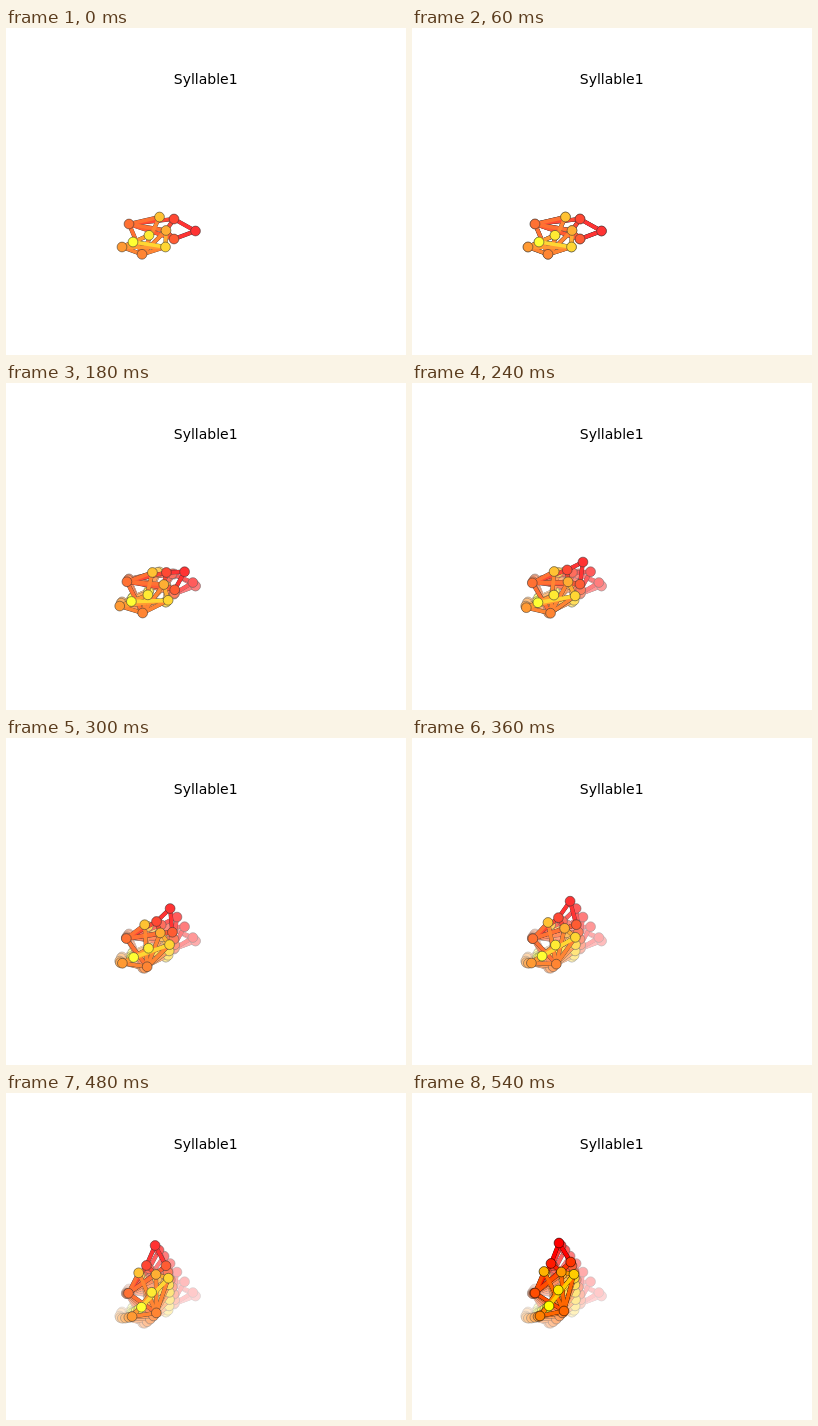
An HTML page that plays this animation: 400x327 px, repeating every 600 ms.

```html
<!DOCTYPE html>
<html lang="en">
<head>
<meta charset="utf-8">
<title>Syllable1</title>
<style>
html, body { margin: 0; width: 100%; height: 100%; overflow: hidden; background: #fff; }
svg { display: block; }
text { font: 14px "DejaVu Sans", sans-serif; text-anchor: middle; }
</style>
</head>
<body>
<svg width="400" height="327" viewBox="0 0 400 327">
  <g id="trail"></g>
  <text x="199.7" y="56">Syllable1</text>
</svg>
<script>
const STEPS = 10, STEP_MS = 60, VEIL = 0.2;
const trail = document.getElementById("trail");

// Each body point follows a quadratic curve: start, control, end
const paths = [
  [[189.5, 203], [168, 174.5], [147, 150]],    // nose
  [[168, 191], [153, 190.5], [139, 170.5]],    // ears
  [[168, 211], [171.5, 207], [158.7, 169]],
  [[123, 196], [117.5, 202.5], [123, 200]],    // hips
  [[136, 226.3], [135, 237.5], [152, 218]],
  [[116, 219], [108, 229], [128, 223]],        // tail
  [[160, 202.5], [156, 204], [149.3, 179]],    // neck
  [[153.5, 189], [138.5, 192], [132, 178.5]],  // shoulders
  [[159.5, 219], [166, 221], [162, 181.3]],
  [[143, 207.3], [139.5, 221], [146.3, 197]],  // spine
  [[127, 214], [121, 226], [137, 213]]
];

const edges = ["0-1", "0-2", "1-3", "1-6", "2-3", "2-6", "3-4", "3-6", "3-7",
  "4-5", "4-6", "4-7", "4-8", "5-8", "5-9", "6-8", "8-10"].map(e => e.split("-").map(Number));

const color = i => `rgb(255,${Math.round(i * 25.5)},0)`;

// The body rests briefly, then rises fast and slows down
const progress = step => 1 - Math.min(1, (STEPS - 1 - step) / 7.3) ** 1.5;

function along([a, b, c], u) {
  const v = 1 - u;
  return [0, 1].map(k => v * v * a[k] + 2 * u * v * b[k] + u * u * c[k]);
}

function add(parent, tag, attrs) {
  const el = document.createElementNS("http://www.w3.org/2000/svg", tag);
  for (const name in attrs) el.setAttribute(name, attrs[name]);
  return parent.appendChild(el);
}

function drawBones(layer, pose, width, paint) {
  for (const [a, b] of edges) {
    const [x1, y1] = pose[a], [x2, y2] = pose[b];
    add(layer, "line", { x1, y1, x2, y2, stroke: paint(a), "stroke-width": width, "stroke-linecap": "square" });
  }
}

function makeLayer(step) {
  const layer = add(trail, "g", {});
  const pose = paths.map(path => along(path, progress(step)));
  drawBones(layer, pose, 4.17, () => "#000");
  drawBones(layer, pose, 3.75, color);
  pose.forEach(([cx, cy], i) => {
    add(layer, "circle", { cx, cy, r: 4.9, fill: color(i), stroke: "#000", "stroke-width": 0.56 });
  });
  // A translucent white sheet fades every earlier pose a bit more
  if (step < STEPS - 1) add(layer, "rect", { width: 400, height: 327, fill: "#fff", opacity: VEIL });
  return layer;
}

const layers = Array.from({ length: STEPS }, (_, i) => makeLayer(i));
const start = performance.now();

function render(ms) {
  const step = Math.floor(ms / STEP_MS) % STEPS;
  layers.forEach((layer, i) => { layer.style.display = i <= step ? "" : "none"; });
}

function tick() {
  render(performance.now() - start);
  requestAnimationFrame(tick);
}
tick();
</script>
</body>
</html>
```
